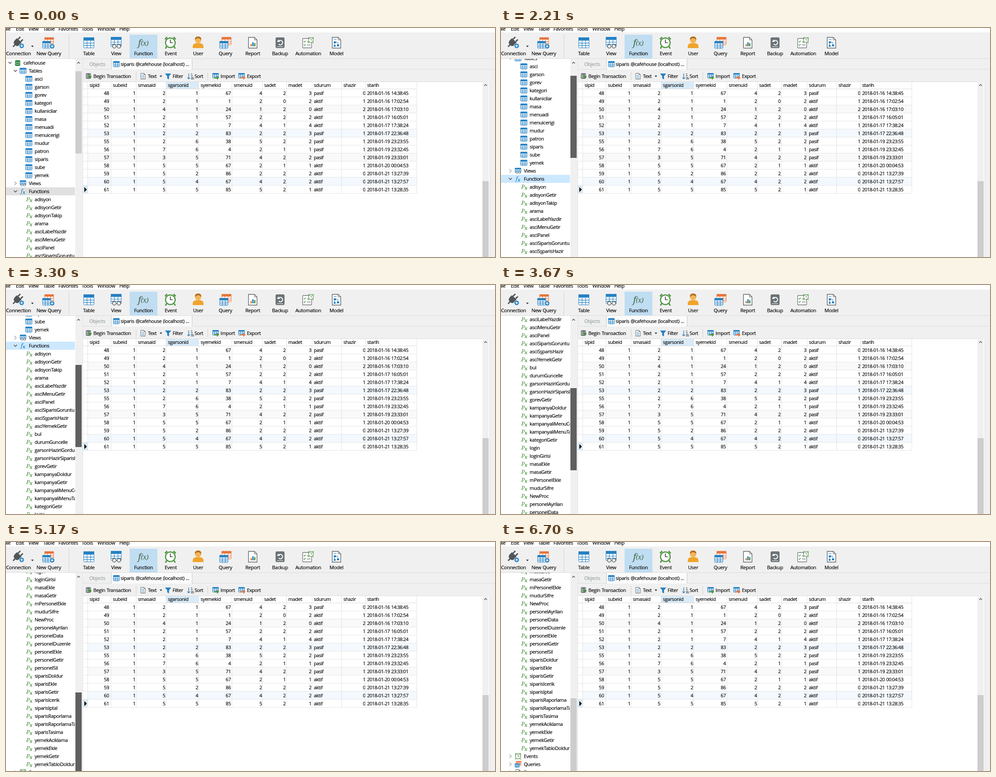
Recreate the animation shown at these times as an HTML page. Size 1092 px wide and 513 px high, loop 7.8 s.

```html
<!DOCTYPE html>
<html lang="en">
<head>
<meta charset="utf-8">
<title>Database browser</title>
<style>
  html, body { margin: 0; width: 100%; height: 100%; overflow: hidden; background: #fff; }
  svg { display: block; width: 1092px; height: 513px; }
  text { font: 10.8px "Open Sans", "Noto Sans", sans-serif; letter-spacing: -.35px; word-spacing: .6px;
    fill: #000; stroke: #000; stroke-width: .18px; white-space: pre; }
  .big { font-size: 11px; letter-spacing: -.3px; }
  .cell { font-size: 10.4px; }
  .muted { fill: #83928b; stroke: none; }
  .formula { font-family: "Noto Serif", "Liberation Serif", serif; font-style: italic; letter-spacing: -.5px; stroke: none; }
</style>
</head>
<body>
<svg id="stage" viewBox="0 0 1092 513"></svg>
<script>
const LOOP = 7800, ROW = 18, TREE_TOP = 69;
const BLUE = '#2581c4', ORANGE = '#e8743b', GREEN = '#4d9440', DARK = '#505558';

const rect = (x, y, w, h, fill, more = '') =>
  `<rect x="${x}" y="${y}" width="${w}" height="${h}" fill="${fill}" ${more}/>`;
const path = (d, stroke, width = 1, fill = 'none') =>
  `<path d="${d}" stroke="${stroke}" stroke-width="${width}" fill="${fill}"/>`;
const shape = (d, fill) => path(d, 'none', 0, fill);
const circle = (x, y, r, fill, stroke = 'none', width = 1) =>
  `<circle cx="${x}" cy="${y}" r="${r}" fill="${fill}" stroke="${stroke}" stroke-width="${width}"/>`;
const text = (x, y, s, more = '') => `<text x="${x}" y="${y}" ${more}>${s}</text>`;
const hline = (x, y, w, color) => rect(x, y, w, 1, color);
const vline = (x, y, h, color) => rect(x, y, 1, h, color);

// Icons, all placed by their centre
function table(x, y, w = 14, h = 12, color = BLUE) {
  const l = x - w / 2, t = y - h / 2, head = h * .3, body = h - head;
  const d = `M${l + w / 3} ${t + head}v${body}M${l + w * 2 / 3} ${t + head}v${body}` +
            `M${l} ${t + head + body / 3}h${w}M${l} ${t + head + body * 2 / 3}h${w}`;
  return rect(l + .5, t + .5, w - 1, h - 1, '#fff', `stroke="${color}" rx="1"`) +
    rect(l, t, w, head, color) + path(d, color, w > 18 ? 1.2 : 1);
}
function glasses(x, y, r) {
  return circle(x - r * 1.3, y, r, '#eef3f5', DARK, r / 3) + circle(x + r * 1.3, y, r, '#eef3f5', DARK, r / 3) +
    path(`M${x - r * 2.3} ${y}l${r * .4} ${-r * 1.4}M${x + r * 2.3} ${y}l${-r * .4} ${-r * 1.4}`, DARK, r / 3);
}
function clock(x, y, r) {
  return path(`M${x - r * .7} ${y + r * .7}l${-r * .2} ${r * .4}M${x + r * .7} ${y + r * .7}l${r * .2} ${r * .4}` +
      `M${x - r} ${y - r * .65}l${r * .4} ${-r * .4}M${x + r} ${y - r * .65}l${-r * .4} ${-r * .4}`, GREEN, r / 4) +
    circle(x, y, r * .9, '#fff', GREEN, r / 5) +
    path(`M${x} ${y - r * .6}V${y}H${x + r * .45}`, '#444', r / 7);
}
function queries(x, y, k = 1) {
  return table(x + 2 * k, y - 3 * k, 18 * k, 15 * k, ORANGE) + table(x - 3 * k, y + 4 * k, 16 * k, 14 * k);
}
function page(x, y, w, h) {
  const l = x - w / 2, t = y - h / 2, f = w * .3;
  return path(`M${l} ${t}h${w - f}l${f} ${f}v${h - f}h${-w}z`, '#5c6266', w > 14 ? 1.4 : 1, '#fff') +
    path(`M${l + w - f} ${t}v${f}h${f}`, '#5c6266', 1);
}
function bars(x, y, k) {
  return [[-5, 5, ORANGE], [-1, 9, BLUE], [3, 7, GREEN]]
    .map(([dx, h, c]) => rect(x + dx * k, y + (7 - h) * k, 3 * k, h * k, c)).join('');
}
function cylinder(x, y, color) {
  return rect(x - 6, y - 4, 12, 9, color) +
    [-4, 5].map(dy => `<ellipse cx="${x}" cy="${y + dy}" rx="6" ry="2" fill="${color}"/>`).join('') +
    path(`M${x - 6} ${y - 2}q6 3 12 0m-12 4q6 3 12 0`, '#fff', 1);
}
const plus = (x, y) => circle(x, y, 5.5, BLUE, '#f0f0f0', 1) + path(`M${x - 3} ${y}h6m-3-3v6`, '#fff', 1.5);
const letters = (x, y, first, color) =>
  `<text class="formula" x="${x}" y="${y + 4}" style="font-size:13px;fill:${color}">${first}` +
  `<tspan dy="2" style="font-size:11px;font-weight:bold">x</tspan></text>`;
const caret = (x, y) => shape(`M${x - 3} ${y - 1.5}h6l-3 3.5z`, '#333');
const chevronDown = (x, y, c = '#444') => path(`M${x - 3.5} ${y - 2}l3.5 3.5l3.5-3.5`, c, 1.3);
const chevronRight = (x, y) => path(`M${x - 2} ${y - 4}l4 4l-4 4`, '#999', 1.2);
const chevronUp = (x, y) => path(`M${x - 3} ${y + 1.5}l3-3l3 3`, '#555', 1.5);

function menuAndToolbar() {
  const menu = [[-6, 'File'], [22, 'Edit'], [50, 'View'], [83, 'Table'], [117, 'Favorites'],
    [169, 'Tools'], [204, 'Window'], [253, 'Help']];
  const y = 33;
  const plug = `<g transform="rotate(45 26 31)">${rect(19, 26, 15, 8, DARK, 'rx="2"')}` +
    `${rect(21, 19, 3, 7, DARK)}${rect(29, 19, 3, 7, DARK)}${shape('M19 32h15q0 8-6 8h-3q-6 0-6-8z', DARK)}${rect(25, 39, 3, 7, DARK)}</g>`;
  const model = page(738, y, 19, 24) + rect(732, 30, 5, 4, BLUE) + rect(739, 37, 5, 4, BLUE) +
    rect(732, 38, 4, 4, BLUE) + path('M734 34v5M737 32h4v5', BLUE, 1) + hline(732, 25, 6, BLUE);
  const automation = rect(662.5, 23.5, 20, 21, '#fff', `stroke="#6d7478" stroke-width="1.3" rx="1"`) +
    path('M665 30l1.500 1.500l3-3m-4.500 9l1.500 1.500l3-3', GREEN, 1.4) +
    path('M672 31h4M672 38h8', '#7d8487', 1.5) + clock(681, 27, 6);
  const backup = rect(602, 21, 20, 24, '#6c7376', 'rx="3"') +
    path('M608 31a5 5 0 1 1 1 5', '#fff', 2) + shape('M605 31h7l-3.5-5z', '#fff') + rect(605, 41, 14, 1.5, '#c9cdcf');
  const items = [
    [28, 'Connection', plug + plus(35, 40)],
    [95.5, 'New Query', queries(94, y, 1.15) + plus(103, 41)],
    [185, 'Table', table(185, y, 24, 24)],
    [246, 'View', table(246, 31, 24, 22) + glasses(247, 41, 4)],
    [307, 'Function', `<text class="formula" x="295" y="40" style="font-size:20px;fill:#3f6546">f<tspan dy="-1" style="font-size:15px">(x)</tspan></text>`],
    [368, 'Event', clock(367, y, 12)],
    [429, 'User', shape('M417 45v-4q0-6 8-7h8q8 1 8 7v4z', '#f0a42c') + circle(429, 27, 7, '#f4b558') +
      shape('M422 27q-1-8 7-8t7 8q-3-4-7-4t-7 4z', '#b56f20')],
    [490, 'Query', queries(490, y, 1.2)],
    [551, 'Report', page(551, y, 19, 24) + bars(551, 34, 1)],
    [612, 'Backup', backup],
    [675, 'Automation', automation],
    [738, 'Model', model]
  ];
  return rect(0, 0, 1092, 69, '#f0f0f0') + rect(0, 0, 1092, 10, '#fff') +
    menu.map(([x, s]) => text(x, 6, s, 'class="big"')).join('') +
    rect(276, 15, 62, 53, '#c0ddf2') + vline(140, 15, 52, '#d2d2d2') + caret(59, 41) +
    items.map(([x, s, icon]) => icon + text(x, 61, s, 'class="big" text-anchor="middle"')).join('') +
    hline(0, 68, 1092, '#dcdcdc');
}

function gridToolbar() {
  const arrow = (x, d) => shape(`M${x} 110h5v-3l5 4.5l-5 4.5v-3h-5z`, d);
  return rect(172, 69, 920, 52, '#f0f0f0') + rect(235, 69, 181, 24, '#fbfbfb') +
    hline(172, 92, 63, '#dcdcdc') + hline(416, 92, 676, '#dcdcdc') + vline(235, 69, 24, '#c8c8c8') + vline(415, 69, 24, '#c8c8c8') +
    text(186, 85, 'Objects', 'class="muted"') + table(246.5, 81, 14, 13) + text(256, 85, 'siparis @cafehouse (localhost) ...') +
    cylinder(184, 107, '#737b7f') + shape('M184 104l8 5l-8 5z', GREEN) + text(195, 112, 'Begin Transaction') +
    vline(290, 99, 18, '#cfcfcf') +
    page(306, 108, 10, 13) + path('M303 106h5m-5 3h6m-6 3h6', BLUE, 1) + text(317, 112, 'Text') + caret(346, 108) +
    shape('M355 102h14l-5 6v7l-4-2v-5z', BLUE) + text(372, 112, 'Filter') +
    path('M408 102v12m-3-3l3 3l3-3', BLUE, 1.4) + path('M413 103h3m-3 4h4m-4 4h6m-6 3h7', DARK, 1.3) + text(421, 112, 'Sort') +
    vline(450, 99, 18, '#cfcfcf') +
    table(468, 107, 14, 12) + arrow(466, GREEN) + text(479, 112, 'Import') +
    table(526, 107, 14, 12) + arrow(525, ORANGE) + text(538, 112, 'Export');
}

function grid() {
  const columns = [['sipid', 183, 230], ['subeid', 235, 289], ['smasaid', 291, 355.5], ['sgarsonid', 358, 429],
    ['syemekid', 431, 502], ['smenuid', 505, 571.5], ['sadet', 573, 624.5], ['madet', 627, 682],
    ['sdurum', 684], ['shazir', 750, 802.5], ['starih', 803]];
  const records = `48 1 2 1 67 4 2 3 pasif 0 16_14:38:45|49 1 2 1 1 2 0 2 aktif 1 16_17:02:54|50 1 4 1 24 1 2 0 aktif 2 16_17:03:10
51 1 2 1 57 2 2 2 aktif 1 17_16:05:01|52 1 2 1 7 4 1 4 aktif 1 17_17:38:24|53 1 2 2 83 2 2 3 pasif 1 17_22:36:48
55 1 2 6 38 5 2 2 pasif 1 19_23:23:55|56 1 7 6 4 2 1 1 pasif 1 19_23:32:45|57 1 3 5 71 4 2 2 pasif 1 19_23:33:01
58 1 5 5 67 2 1 1 aktif 1 20_00:04:53|59 1 5 2 86 2 2 2 aktif 0 21_13:27:39|60 1 5 4 67 4 2 2 aktif 0 21_13:27:57
61 1 5 5 85 5 2 1 aktif 0 21_13:28:35`.split(/[|\n]/).map(r => r.split(' '));
  const top = 137, bottom = top + records.length * ROW;
  let out = rect(172, 120, 909, 393, '#fff') + rect(358, 120, 73, 17, '#d9ebf9') + rect(172, bottom - ROW, 11, ROW, '#d9ebf9');
  records.forEach((record, i) => {
    const y = top + i * ROW;
    if (i % 3 === 2) out += rect(183, y, 734, ROW, i % 2 ? '#f3f9fe' : '#f9f9f9');
    out += hline(172, y + ROW - 1, 745, '#e6e6e6');
    record.forEach((value, c) => {
      const [, left, right] = columns[c];
      const label = c === 10 ? '2018-01-' + value.replace('_', ' ') : value;
      out += right ? text(right, y + 13, label, 'class="cell" text-anchor="end"') : text(left + 3.5, y + 13, label, 'class="cell"');
    });
  });
  columns.forEach(([name, x]) => { out += vline(x - 1, 120, bottom - 120, '#e2e2e2') + text(x + 3.5, 132, name); });
  return out + vline(917, 120, bottom - 120, '#e2e2e2') + hline(172, 120, 892, '#dcdcdc') + hline(172, 136, 745, '#dcdcdc') +
    shape('M175 356.500l5.500 5.500l-5.500 5.500z', '#000') +
    rect(1064, 120, 14, 393, '#f0f0f0') + rect(1064, 343, 14, 170, '#cdcdcd') + chevronUp(1071, 128) +
    rect(1081, 93, 11, 420, '#f0f0f0') + vline(1080, 120, 393, '#dadada');
}

function tree() {
  const tables = 'asci garson gorev kategori kullanicilar masa menuadi menuicerigi mudur patron siparis sube yemek'.split(' ');
  const routines = ('adisyon adisyonGetir adisyonTakip arama asciLabelYazdir asciMenuGetir asciPanel asciSiparisGoruntu ' +
    'asciSşparisHazir asciYemekGetir bul durumGuncelle garsonHaziriGordu garsonHazirSiparisler gorevGetir kampanyaDoldur ' +
    'kampanyaGetir kampanyaliMenuCek kampanyaliMenuTablo kategoriGetir login loginGirisi masaEkle masaGetir mPersonelEkle ' +
    'mudurSifre NewProc personelAyrilan personelData personelDuzenle personelEkle personelGetir personelSil siparisDoldur ' +
    'siparisEkle siparisGetir siparisIcerik siparisIptal siparisRaporlama siparisRaporlamaTarih siparisTasima yemekAciklama ' +
    'yemekEkle yemekGetir yemekTabloDoldur').split(' ');
  const folder = (name, icon, open) => y => (open ? chevronDown : chevronRight)(21, y) + icon(y) + text(51, y + 4, name);
  const rows = [
    y => chevronDown(9, y) + cylinder(26, y, '#25803c') + text(39, y + 4, 'cafehouse'),
    folder('Tables', y => table(38, y, 15, 13), true),
    ...tables.map(name => y => table(51, y, 15, 13) + text(64, y + 4, name)),
    folder('Views', y => table(38, y - 1, 14, 11) + glasses(38.5, y + 4, 2.2)),
    folder('Functions', y => letters(33, y, 'f', BLUE), true),
    ...routines.map(name => y => letters(45, y, 'P', GREEN) + text(64, y + 4, name)),
    folder('Events', y => clock(38, y, 6.5)),
    folder('Queries', y => queries(38, y, .65)),
    folder('Reports', y => page(38, y, 10, 13) + bars(38, y, .6))
  ];
  const selected = 2 + tables.length + 1;
  return rect(0, TREE_TOP + selected * ROW, 154, ROW, '#e0e0e0', 'id="selection"') +
    rows.map((draw, i) => draw(TREE_TOP + 9 + i * ROW)).join('');
}

const stage = document.getElementById('stage');
stage.innerHTML = `<clipPath id="treeClip">${rect(0, TREE_TOP, 154, 444, '#fff')}</clipPath>` +
  rect(0, 0, 1092, 513, '#fff') + `<g clip-path="url(#treeClip)"><g id="tree">${tree()}</g></g>` +
  rect(155, TREE_TOP, 17, 444, '#f0f0f0') + rect(155, 97, 14, 184, '#cdcdcd', 'id="thumb"') + chevronUp(162, 78) +
  vline(171, TREE_TOP, 444, '#e2e2e2') + gridToolbar() + grid() + menuAndToolbar();

const [treeNode, thumb, selection] = ['tree', 'thumb', 'selection'].map(id => document.getElementById(id));

// Drag strokes: first step, last step, step count, scroll reached
const strokes = [
  [2130, 2210, 2, 28], [2290, 2840, 8, 142], [2900, 2900, 1, 160], [2980, 3070, 2, 200],
  [3300, 3670, 6, 379], [3760, 3980, 4, 470], [4280, 4520, 4, 561], [4590, 5050, 7, 665],
  [5170, 5170, 1, 678], [5280, 5590, 5, 699], [5760, 6010, 4, 714]
];

function scrollAt(t) {
  let scroll = 0;
  for (const [start, end, count, target] of strokes) {
    if (t < start) break;
    const done = t >= end ? count : 1 + Math.floor((t - start) * (count - 1) / (end - start));
    scroll += (target - scroll) * done / count;
  }
  return Math.round(scroll);
}

function thumbColor(t) {
  if (t < 1350 || t >= 6700) return '#cdcdcd';
  if (t < 1430) return '#a6a6a6';
  if (t < 6230) return '#606060';
  return t < 6300 ? '#838383' : '#a6a6a6';
}

function render(t) {
  const scroll = scrollAt(t);
  treeNode.setAttribute('transform', `translate(0 ${-scroll})`);
  thumb.setAttribute('y', 97 + Math.round(scroll * .3545));
  thumb.setAttribute('fill', thumbColor(t));
  selection.setAttribute('fill', t < 1980 ? '#e0e0e0' : '#cce8ff');
}

const begin = performance.now();
function tick() {
  render((performance.now() - begin) % LOOP);
  requestAnimationFrame(tick);
}
render(0);
requestAnimationFrame(tick);
</script>
</body>
</html>
```
